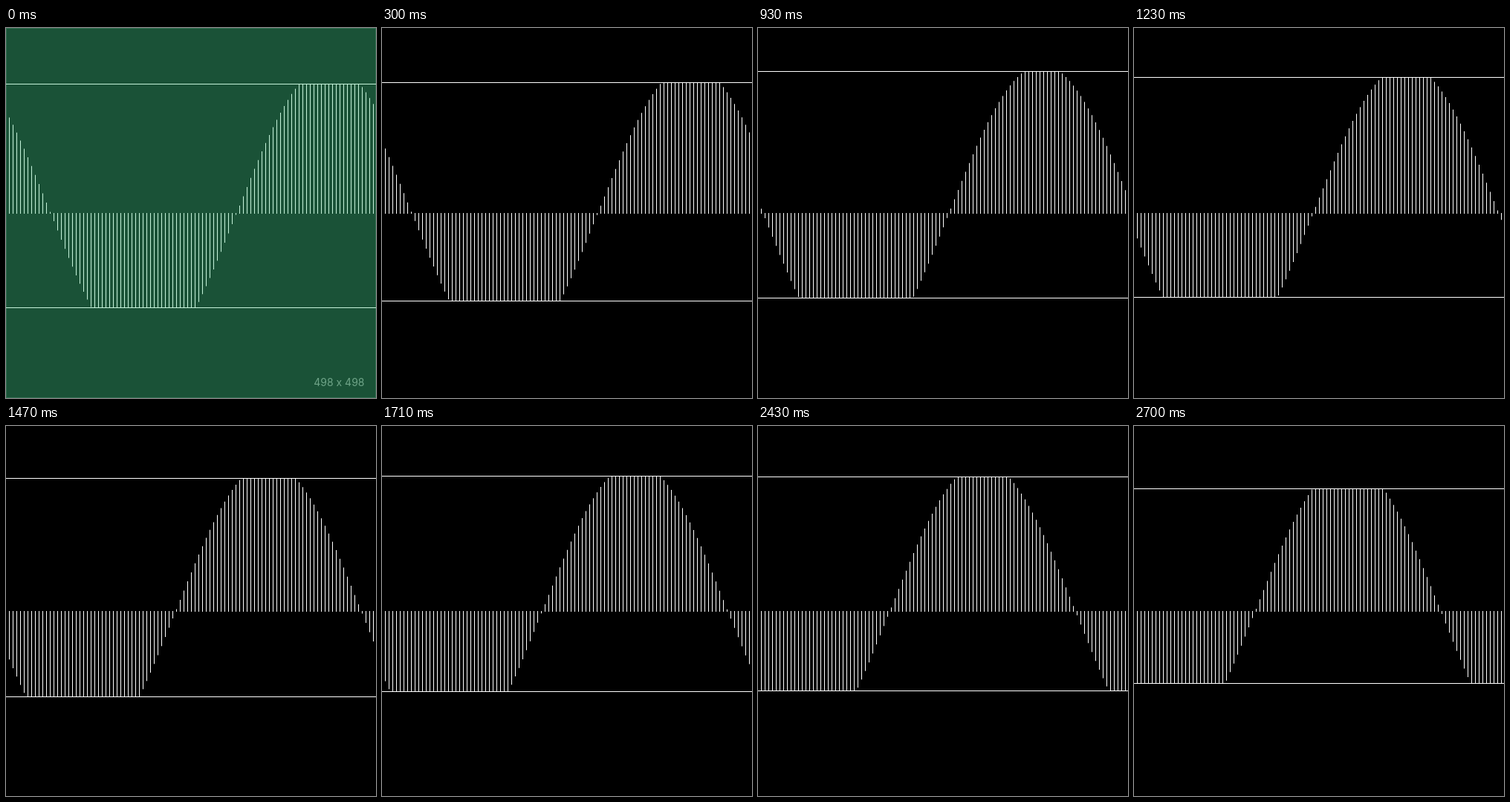
An HTML page for the animation above (2.73 s loop, 498 by 498 pixels).

```html
<!DOCTYPE html>
<html lang="en">
<head>
<meta charset="utf-8">
<title>Clipped wave</title>
<style>
  html, body { margin: 0; width: 100%; height: 100%; overflow: hidden; background: #000; }
  svg { display: block; width: 100vw; height: 100vh; }
  text { font: 14px Inter, Roboto, sans-serif; fill: #6fa488; text-anchor: end; }
</style>
</head>
<body>
<svg viewBox="0 0 498 498">
  <rect id="bg" width="498" height="498"/>
  <g id="cover">
    <rect x=".5" y=".5" width="497" height="497" fill="none" stroke="#327052"/>
    <text x="482.5" y="482">498 x 498</text>
  </g>
  <path id="wave"/>
</svg>
<script>
const LOOP = 2730, STEP = 30;
const SIZE = 498, MID = 249.5, AMP = 200, PERIOD = 500;
const GAP = 5, FIRST = 4, BARS = 99;

// [time, y] points along the drifting limits
const TOP = [[-75, 75], [300, 73], [810, 56], [930, 58], [1080, 61], [1230, 66],
  [1470, 70], [1710, 67], [2100, 61], [2230, 57], [2700, 84]];
const BOTTOM = [[-75, 376], [300, 367], [540, 365], [930, 363], [1230, 362],
  [1470, 364], [1620, 360], [1710, 357], [2100, 352], [2330, 358], [2700, 346]];

const bg = document.getElementById('bg');
const cover = document.getElementById('cover');
const wave = document.getElementById('wave');

const clamp = (v, lo, hi) => Math.min(hi, Math.max(lo, v));
const box = (x, y, w, h) => `M${x} ${y.toFixed(2)}h${w}v${h.toFixed(2)}h${-w}z`;

// Slope at a point, flat at turning points and at both ends
function slope(pts, i) {
  if (i === 0 || i === pts.length - 1) return 0;
  const [a, b, c] = [pts[i - 1], pts[i], pts[i + 1]];
  const l = (b[1] - a[1]) / (b[0] - a[0]);
  const r = (c[1] - b[1]) / (c[0] - b[0]);
  return l * r > 0 ? 2 * l * r / (l + r) : 0;
}

function curve(pts, t) {
  let i = 0;
  while (i < pts.length - 2 && t > pts[i + 1][0]) i++;
  const [t0, y0] = pts[i], [t1, y1] = pts[i + 1];
  const d = t1 - t0, u = clamp((t - t0) / d, 0, 1), v = 1 - u;
  return v * v * (1 + 2 * u) * y0 + u * u * (3 - 2 * u) * y1 +
    d * u * v * (v * slope(pts, i) - u * slope(pts, i + 1));
}

function draw(ms) {
  const n = Math.floor((ms % LOOP) / STEP);
  const isCover = n === 0;
  const t = isCover ? -75 : n * STEP;
  const top = Math.round(curve(TOP, t));
  const bottom = Math.round(curve(BOTTOM, t));
  const phase = 0.02 * t / STEP;

  let d = box(0, top, SIZE, 1) + box(0, bottom, SIZE, 1);
  for (let i = 0; i < BARS; i++) {
    const x = FIRST + i * GAP;
    const a = (x - 305.8) * 2 * Math.PI / PERIOD + phase;
    const y = clamp(MID - AMP * Math.sin(a), top, bottom);
    d += y < MID ? box(x, y, 1, 250 - y) : box(x, 249, 1, y - 249);
  }
  wave.setAttribute('d', d);
  wave.setAttribute('fill', isCover ? '#c5f3da' : '#fff');
  bg.setAttribute('fill', isCover ? '#1a5237' : '#000');
  cover.setAttribute('visibility', isCover ? 'visible' : 'hidden');
}

const start = performance.now();
function tick() {
  draw(performance.now() - start);
  requestAnimationFrame(tick);
}
draw(0);
requestAnimationFrame(tick);
</script>
</body>
</html>
```
